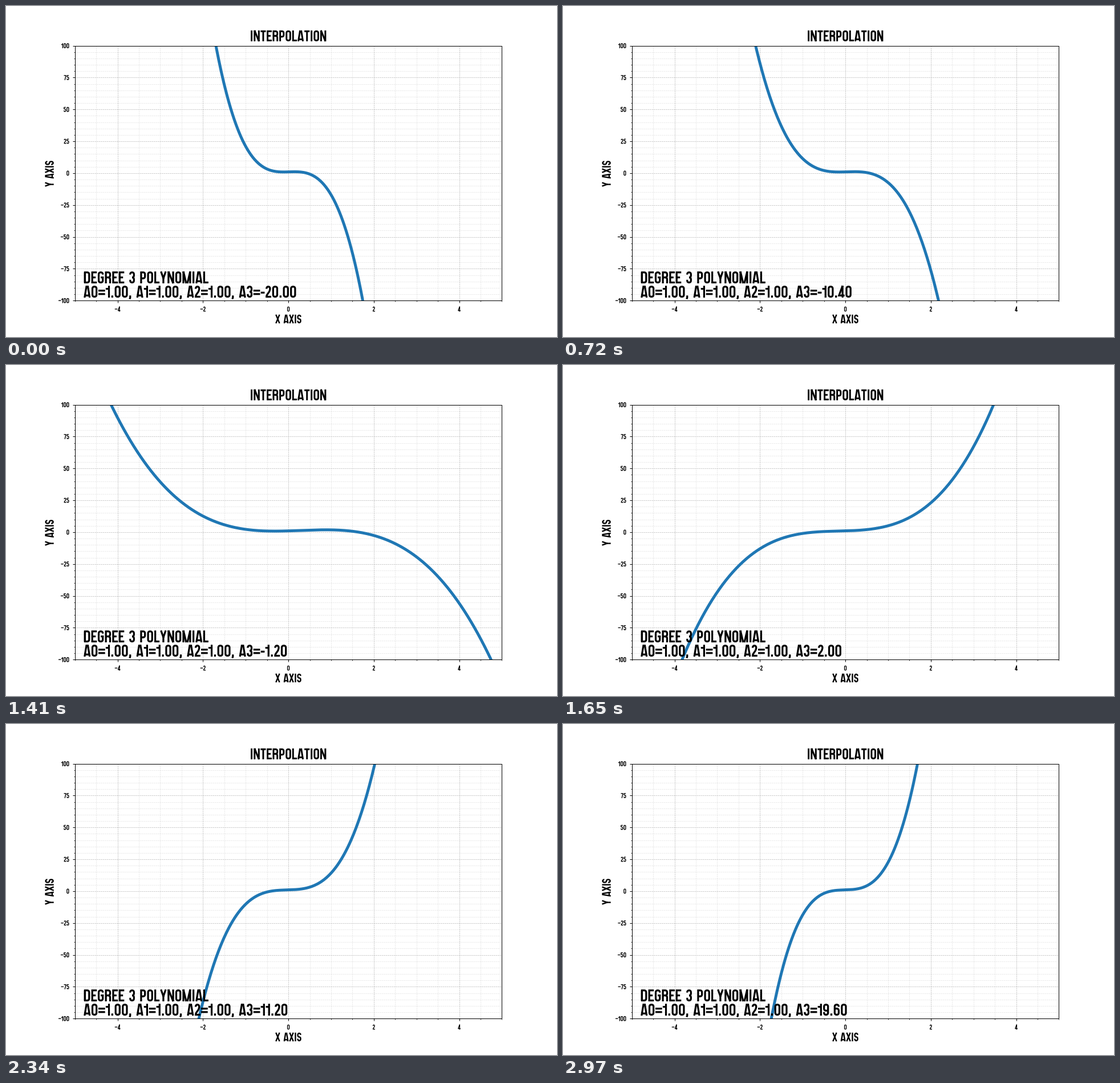
Write a matplotlib script that moves like this. It is 966 px wide and 580 px high and loops after 3 s.

```python
import matplotlib.pyplot as plt
import numpy as np
from matplotlib.animation import FuncAnimation
from matplotlib.patches import PathPatch
from matplotlib.path import Path
from matplotlib.ticker import MultipleLocator, NullFormatter
from matplotlib.transforms import Affine2D

W, H, DPI = 966, 580, 100
PX = 72 / DPI    # one pixel in points
FRAMES, INTERVAL = 100, 30
STEM = 0.155     # stroke width, in cap heights
ROUND = 0.17     # corner radius, in cap heights

# Condensed capitals drawn as strokes: advance, then strokes of column + row.
# An upper-case column letter marks a rounded corner.
GLYPHS = {
    " ": (0.345, ""),
    "A": (0.63, "p0 a9|q0 b9|p2 q2"),
    "D": (0.615, "l1 l8 R8 R1 l1 l8"),
    "E": (0.545, "f8 l8 l1 f1|l5 r5"),
    "G": (0.605, "r7 R8 L8 L1 R1 r5 c5"),
    "I": (0.29, "c0 c9"),
    "L": (0.515, "l9 l1 f1"),
    "M": (0.83, "l0 l9|r0 r9|l9 a0|r9 b0"),
    "N": (0.655, "l0 l9|r0 r9|l9 r0"),
    "O": (0.605, "l5 L8 R8 R1 L1 l5"),
    "P": (0.585, "l0 l8 R8 R4 l4"),
    "R": (0.615, "l0 l8 R8 R5 l5|c5 R5 r0"),
    "S": (0.58, "r7 R8 L8 L5 R5 R1 L1 l3"),
    "T": (0.545, "e8 f8|c0 c8"),
    "X": (0.615, "p0 q9|q0 p9"),
    "Y": (0.6, "p9 c4|q9 c4|c0 c5"),
    "0": (0.605, "l5 L8 R8 R1 L1 l5"),
    "1": (0.43, "r0 r9|e7 r7"),
    "2": (0.555, "l7 L8 R8 R6 L2 l1 f1"),
    "3": (0.575, "l7 L8 R8 R5 c5|c5 R5 R1 L1 l3"),
    "4": (0.6, "d0 d9|d9 p2 f2"),
    "5": (0.585, "q8 l8 l6 R6 R1 L1 l3"),
    "6": (0.6, "r7 R8 L8 L1 R1 R6 l6"),
    "7": (0.53, "e8 q8 a0"),
    "8": (0.6, "l7 L8 R8 R5 L5 l7|l3 L5 R5 R1 L1 l3"),
    "9": (0.595, "l3 L1 R1 R8 L8 L4 r4"),
    "=": (0.62, "e3 f3|e6 f6"),
    ".": (0.3, "c0 c2"),
    ",": (0.3, "c2 c0 a-"),
    "-": (0.385, "e4 f4"),
    "\u2212": (0.57, "e5 f5"),
}
ROWS = dict(zip("-0123456789",
                (-0.12, 0, 0.075, 0.18, 0.3, 0.42, 0.5, 0.59, 0.74, 0.925, 1)))


def column(name, adv):
    mid = adv / 2
    return {"l": 0.13, "r": adv - 0.13, "c": mid, "a": mid - 0.05,
            "b": mid + 0.05, "p": 0.1, "q": adv - 0.1, "e": 0.03,
            "f": adv - 0.03, "d": adv - 0.2}[name.lower()]


def stroke(spec, adv, x0):
    """Vertices and codes of one stroke, with its marked corners rounded."""
    nodes = spec.split()
    pts = [np.array([x0 + column(n[0], adv), ROWS[n[1]]]) for n in nodes]
    last = len(pts) - 1
    verts, codes = [pts[0]], [Path.MOVETO]
    for i in range(1, last + 1):
        p = pts[i]
        if i == last or nodes[i][0].islower():
            verts.append(p)
            codes.append(Path.LINETO)
            continue
        ends = []
        for j in (i - 1, i + 1):
            d = pts[j] - p
            size = np.hypot(*d)
            room = size if j in (0, last) else size / 2
            ends.append(p + d / size * min(ROUND, room))
        verts += [ends[0], p, ends[1]]
        codes += [Path.LINETO, Path.CURVE3, Path.CURVE3]
    return verts, codes


def text_path(text, x, y, cap, align=0.0, angle=0):
    """Outline of text with its baseline at pixel (x, y) from the top left."""
    verts, codes, pen = [], [], 0.0
    for ch in text:
        adv, spec = GLYPHS[ch]
        for part in filter(None, spec.split("|")):
            v, c = stroke(part, adv, pen)
            verts += v
            codes += c
        pen += adv
    place = (Affine2D().translate(-align * pen, 0).scale(cap)
             .rotate_deg(angle).translate(x, H - y))
    return Path(place.transform(np.array(verts)), codes)


fig = plt.figure(figsize=(W / DPI, H / DPI), dpi=DPI, facecolor="white")
ax = fig.add_axes([0.125, 0.11, 0.775, 0.77])
pixels = Affine2D().scale(1 / DPI) + fig.dpi_scale_trans


def label(text, x, y, cap, align=0.0, angle=0):
    patch = PathPatch(text_path(text, x, y, cap, align, angle), fill=False,
                      ec="black", lw=STEM * cap * PX, capstyle="butt",
                      joinstyle="miter", snap=False, transform=pixels)
    return fig.add_artist(patch)


ax.set(xlim=(-5, 5), ylim=(-100, 100))
for axis, major, minor in ((ax.xaxis, 2, 0.5), (ax.yaxis, 25, 5)):
    axis.set_major_locator(MultipleLocator(major))
    axis.set_minor_locator(MultipleLocator(minor))
    axis.set_major_formatter(NullFormatter())
ax.set_axisbelow(True)
ax.spines[:].set_linewidth(PX)
ax.tick_params(which="major", length=4.4 * PX, width=PX)
ax.tick_params(which="minor", length=2.5 * PX, width=0.75 * PX)
ax.grid(which="major", color="#b0b0b0", ls="--", lw=0.65 * PX)
ax.grid(which="minor", color="#b0b0b0", ls="--", lw=0.65 * PX, alpha=0.4)

left, right, top, bottom = 0.125 * W, 0.9 * W, 0.12 * H, 0.89 * H
mid_x, mid_y = (left + right) / 2, (top + bottom) / 2
TICK, NAME, TITLE, NOTE = 8.7, 15.2, 19.0, 20.8


def signed(v):
    return str(v).replace("-", "\u2212")


for v in range(-4, 5, 2):
    label(signed(v), mid_x + v * (right - left) / 10, 535.4, TICK, 0.5)
for v in range(-100, 101, 25):
    y = mid_y - v * (bottom - top) / 200
    label(signed(v), 111, y + TICK / 2, TICK, 1)
label("INTERPOLATION", mid_x, 61.8, TITLE, 0.5)
label("X AXIS", mid_x, 556, NAME, 0.5)
label("Y AXIS", 83.7, mid_y + 1, NAME, 0.5, 90)
label("DEGREE 3 POLYNOMIAL", 135.7, 486, NOTE)

NOTE_AT = (135.7, 511, NOTE)
note = label("A0=1.00", *NOTE_AT)
xs = np.linspace(-5, 5, 500)
curve, = ax.plot(xs, xs, color="#1f77b4", lw=5 * PX)


def update(i):
    a3 = (i - 50) * 0.4
    curve.set_ydata(1 + xs + xs**2 + a3 * xs**3)
    note.set_path(text_path(f"A0=1.00, A1=1.00, A2=1.00, A3={a3:.2f}", *NOTE_AT))
    return curve, note


anim = FuncAnimation(fig, update, frames=FRAMES, interval=INTERVAL,
                     repeat=True, repeat_delay=0, blit=False)
plt.show()
```
